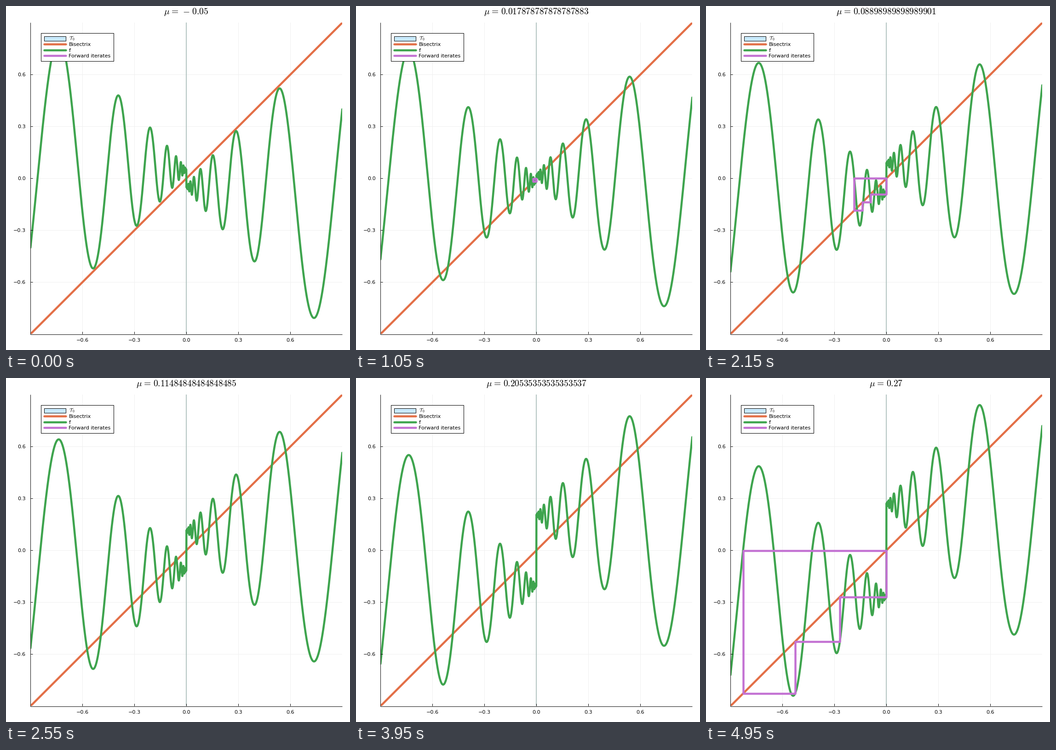
A matplotlib script for the animation above (5 s loop, 748 px wide and 749 px high).

```python
import numpy as np
import matplotlib.pyplot as plt
from matplotlib.animation import FuncAnimation
from matplotlib.patches import Rectangle

W, H, DPI = 748, 749, 64
FRAMES, INTERVAL = 100, 50
MU_START, MU_END = -0.05, 0.27
LIMIT = 0.9
BAND = 0.001          # half width of the strip around zero
MAX_PERIOD = 4
LEFT, RIGHT, TOP, BOTTOM = 53.2, 731.2, 36.4, 714.4

ORANGE, GREEN, PURPLE = "#e36f47", "#3ea44e", "#c371d2"
SKY, STRIP, GRID = "#c8e9fd", "#a3b8b6", "#f0f0f0"

plt.rcParams["font.family"] = "DejaVu Sans"
plt.rcParams["mathtext.fontset"] = "cm"


def pt(px):
    return px * 72 / DPI


def f(x, mu):
    r = np.abs(x)
    return np.sign(x) * (mu + r**0.9 * np.cos(10 * np.log(r)))


def mu_at(i):
    t = i / (FRAMES - 1)
    return (1 - t) * MU_START + t * MU_END


def returning_orbit(mu):
    """Shortest one-sided orbit that leaves the strip and comes back to it."""
    x = -np.linspace(BAND, BAND / 100, 6000)
    orbit, alive = [x], np.ones(x.size, bool)
    for _ in range(MAX_PERIOD):
        x = f(x, mu)
        orbit.append(x)
        hits = np.flatnonzero(alive & (np.abs(x) < BAND))
        if hits.size:
            return [step[hits[0]] for step in orbit]
        alive &= x < 0
    return []


def cobweb(orbit):
    """Staircase between the graph and the bisectrix."""
    corners = np.repeat(orbit, 2)
    return corners[:-1], corners[1:]


def title_text(mu):
    sign = r"\;{-}\;" if mu < 0 else ""
    return rf"$\mu\hspace{{0.1}}=\hspace{{0.1}}{sign}{abs(mu)!r}$"


fig = plt.figure(figsize=(W / DPI, H / DPI), dpi=DPI, facecolor="white")

# Plot area
ax = fig.add_axes([LEFT / W, 1 - BOTTOM / H, (RIGHT - LEFT) / W, (BOTTOM - TOP) / H])
ax.set(xlim=(-LIMIT, LIMIT), ylim=(-LIMIT, LIMIT))
ax.axis("off")

# Page layer in pixels, y downwards
page = fig.add_axes([0, 0, 1, 1])
page.set(xlim=(0, W), ylim=(H, 0))
page.axis("off")


def stroke(xs, ys, color, width=1.0, cap="butt", layer=page, **kw):
    return layer.plot(xs, ys, color=color, lw=pt(width), solid_capstyle=cap,
                      solid_joinstyle="round", **kw)[0]


def label(x, y, text, size=11.1, ha="left"):
    return page.text(x, y, text, fontsize=pt(size), ha=ha, va="baseline", color="black")


def box(x, y, w, h, fill):
    page.add_patch(Rectangle((x, y), w, h, fc=fill, ec="black", lw=pt(1), zorder=3))


# Grid, ticks and axes
scale = (RIGHT - LEFT) / (2 * LIMIT)
cx, cy = (LEFT + RIGHT) / 2, (TOP + BOTTOM) / 2
for v in (-0.6, -0.3, 0.0, 0.3, 0.6):
    px, py = cx + v * scale, cy - v * scale
    text = f"{v:.1f}".replace("-", "\u2212")
    ax.axvline(v, color=GRID, lw=pt(1), zorder=0)
    ax.axhline(v, color=GRID, lw=pt(1), zorder=0)
    stroke([px, px], [BOTTOM, BOTTOM - 5], "black")
    stroke([LEFT, LEFT + 5], [py, py], "black")
    label(px, 731, text, ha="center")
    label(43.3, py + 4, text, ha="right")
stroke([53.5, 53.5], [TOP, 715], "#222222", 1.1)
stroke([53, RIGHT], [714.5, 714.5], "#222222", 1.1)

# Curves
xs = np.linspace(-LIMIT, LIMIT, 2400)
ax.axvline(0, color=STRIP, lw=pt(1.6), zorder=1)
stroke([-1, 1], [-1, 1], ORANGE, 4.5, layer=ax, zorder=2)
curve = stroke([], [], GREEN, 4.5, "round", ax, zorder=3)
iterates = stroke([], [], PURPLE, 4.5, "round", ax, zorder=4)

# Legend
box(76.5, 58.5, 158, 61, "white")
box(83.5, 66, 46.5, 9.5, SKY)
label(137, 74, r"$\mathcal{T}_{\,0}$")
rows = (("Bisectrix", ORANGE), ("f", GREEN), ("Forward iterates", PURPLE))
for k, (name, color) in enumerate(rows):
    y = 83.4 + 12.1 * k
    stroke([83.5, 130], [y, y], color, 4.5, "round", zorder=4)
    label(136.5, y + 4, name)

title = label(392, 18.4, "", 19.44, "center")


def update(i):
    mu = mu_at(i)
    curve.set_data(xs, f(xs, mu))
    iterates.set_data(*cobweb(returning_orbit(mu)))
    title.set_text(title_text(mu))
    return curve, iterates, title


anim = FuncAnimation(fig, update, frames=FRAMES, interval=INTERVAL,
                     repeat=True, repeat_delay=0, blit=False)
plt.show()
```
